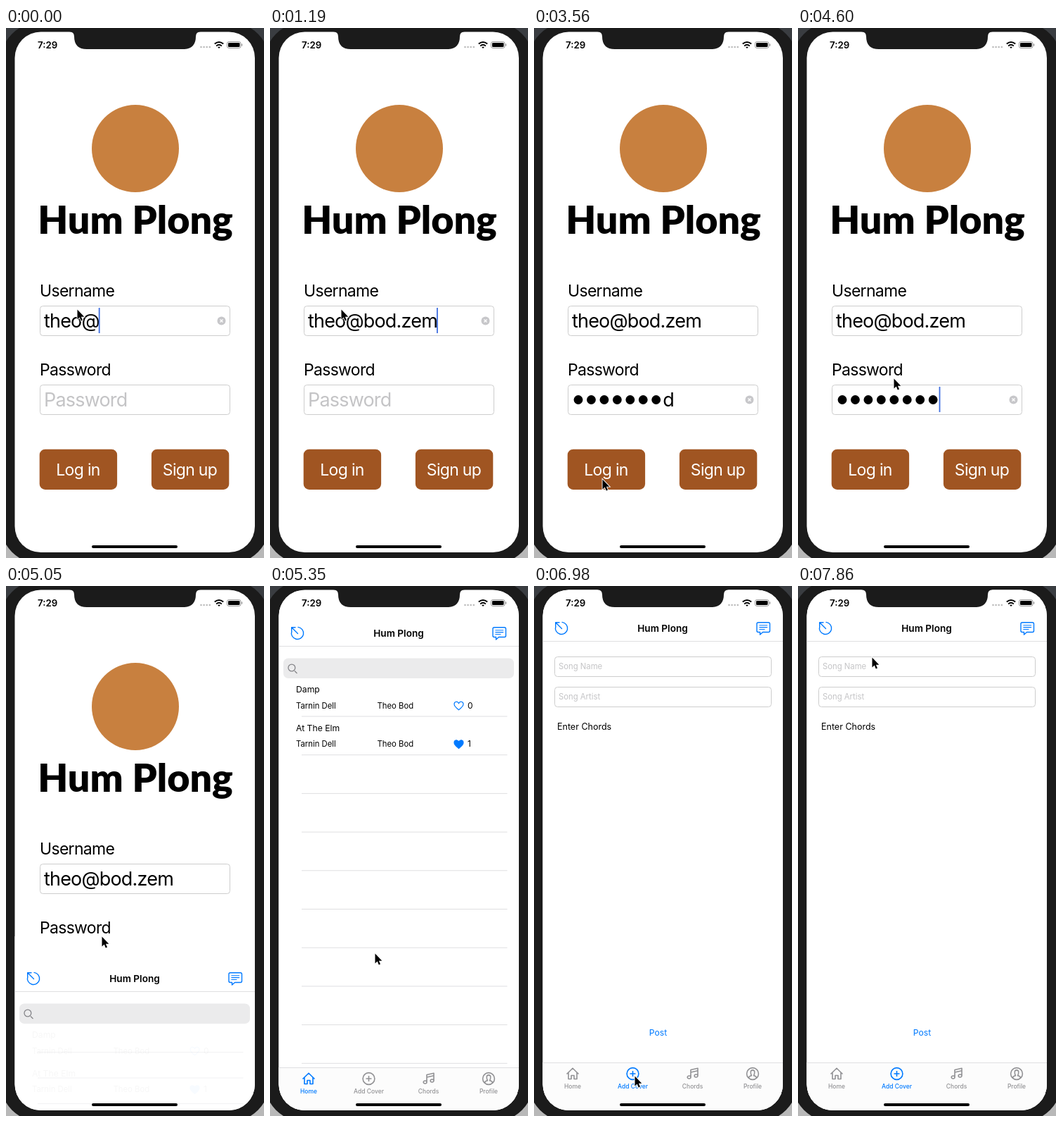
Recreate the animation shown at these times as an HTML page. Size 367x752 px, loop 8000 ms.

```html
<!DOCTYPE html>
<html lang="en">
<head>
<meta charset="utf-8">
<title>Hum Plong</title>
<style>
  html, body { margin: 0; width: 100%; height: 100%; overflow: hidden; background: #1b1b1b; }
  svg { display: block; width: 100%; height: 100%; font-family: Inter, Roboto, sans-serif; }
  .big { font-size: 23px; letter-spacing: -.03em; }
  .entry { font-size: 27px; letter-spacing: -.03em; }
  .title { font: 900 55.5px Lato, "Open Sans", sans-serif; }
  .row { font-size: 12.2px; }
  .sub { font-size: 11.3px; }
  .mid { text-anchor: middle; }
  .hint { fill: #c4c4c6; }
  .box { fill: #fff; stroke: #cdcdcd; }
  .line { fill: none; stroke: #dfdfe1; }
  .icon { fill: none; stroke: #007aff; stroke-width: 1.4; stroke-linecap: round; stroke-linejoin: round; }
  .tab { color: #929295; font-size: 8.5px; font-weight: 500; }
  .tab.on { color: #007aff; }
  .tab path { fill: none; stroke: currentColor; stroke-width: 1.6; stroke-linejoin: round; }
  .tab text { fill: currentColor; }
</style>
</head>
<body>
<svg viewBox="0 0 367 752">
  <defs>
    <clipPath id="glass"><rect x="12.5" y="5.5" width="341.5" height="738.5" rx="37"/></clipPath>
    <path id="heart" d="M0 5.7C-4 2.8-6.5.4-6.5-2.4C-6.5-6.2-1.8-7.2 0-3.6C1.8-7.2 6.5-6.2 6.5-2.4C6.5.4 4 2.8 0 5.7Z"/>
    <g id="clear">
      <circle r="6" fill="#c7c7ca"/>
      <path d="M-2-2 2 2M2-2-2 2" stroke="#fff" stroke-width="1.3"/>
    </g>
  </defs>

  <rect width="367" height="376" fill="#3a3d41"/>
  <rect y="376" width="367" height="376" fill="#b8b8b8"/>
  <rect x="-8" y="-8" width="383" height="768" rx="56" fill="#1b1b1b"/>

  <g clip-path="url(#glass)">
    <rect width="367" height="752" fill="#fff"/>

    <g id="login">
      <circle cx="184" cy="171" r="62" fill="#c8803f"/>
      <text class="title mid" x="184" y="292">Hum Plong</text>
      <text class="big" x="48" y="381">Username</text>
      <rect class="box" x="48.5" y="394.5" width="270" height="42" rx="4"/>
      <text class="entry" id="user" x="54" y="425"/>
      <text class="big" x="48" y="493">Password</text>
      <rect class="box" x="48.5" y="506.5" width="270" height="42" rx="4"/>
      <text class="entry hint" id="passHint" x="54" y="537">Password</text>
      <g id="dots"></g>
      <text class="entry" id="last" y="537"/>
      <use href="#clear" id="clearBtn"/>
      <rect id="caret" x="-1" width="1.8" height="36" fill="#3f6fe0"/>
      <g fill="#a05522">
        <rect x="47.7" y="597.7" width="110.4" height="57.2" rx="8"/>
        <rect x="206.9" y="597.7" width="110.4" height="57.2" rx="8"/>
      </g>
      <g class="big mid" fill="#fff">
        <text x="102.5" y="635">Log in</text>
        <text x="261.5" y="635">Sign up</text>
      </g>
    </g>

    <g id="app">
      <rect width="367" height="752" fill="#fff"/>
      <text class="mid" x="183" y="65" font-size="13.6" font-weight="600">Hum Plong</text>
      <g class="icon">
        <path d="M40 51.4A8.6 8.6 0 1 1 30.9 57.2M39.5 60.5 31 52M30.7 57V51.7H36"/>
        <path d="M319 51.7H333.5Q335.5 51.7 335.5 53.7V63.5Q335.5 65.5 333.5 65.5H325.5L321.5 69V65.5H319Q317 65.5 317 63.5V53.7Q317 51.7 319 51.7Z"/>
        <path d="M320.8 55.7H331.7M320.8 58.6H331.7M320.8 61.5H328" stroke-width="1.1"/>
      </g>
      <path class="line" d="M13 78.5H354"/>

      <g id="home">
        <rect x="19" y="95.5" width="328" height="28.5" rx="7" fill="#ebebec"/>
        <path d="M35 113.5 38.5 117M35.8 109A4.9 4.9 0 1 1 26 109A4.9 4.9 0 1 1 35.8 109" fill="none" stroke="#858589" stroke-width="1.3"/>
        <path class="line" id="rules"/>
        <g id="rows"></g>
      </g>

      <g id="add">
        <rect class="box" x="29.5" y="100.5" width="308" height="28" rx="4"/>
        <rect class="box" x="29.5" y="143.5" width="308" height="28" rx="4"/>
        <g class="sub hint">
          <text x="35" y="118">Song Name</text>
          <text x="35" y="161">Song Artist</text>
        </g>
        <text x="33" y="204" font-size="12.5">Enter Chords</text>
        <text class="mid" x="176.5" y="638" font-size="12.2" fill="#007aff">Post</text>
      </g>

      <rect y="676" width="367" height="76" fill="#fcfcfc"/>
      <path class="line" d="M13 676.5H354"/>
      <g id="tabs"></g>
    </g>

    <rect x="122" y="734" width="122" height="4" rx="2"/>
  </g>

  <path d="M90 5Q97 5.5 97 12Q97 30 115 30H252Q270 30 270 12Q270 5.5 277 5Z" fill="#1b1b1b"/>
  <text x="45" y="28.5" font-size="13.3" font-weight="600">7:29</text>
  <path d="M277.5 27H291" stroke="#bbb" stroke-width="2.6" stroke-linecap="round" stroke-dasharray="0 4.1"/>
  <g fill="none" stroke="#000" stroke-width="2">
    <path d="M296.8 22.6Q303 17.4 309.2 22.6M299.2 25.4Q303 22.2 306.8 25.4"/>
    <path d="M301.2 27.2Q303 25.6 304.8 27.2L303 29Z" fill="#000" stroke="none"/>
    <rect x="314.5" y="19.5" width="19.5" height="9" rx="2.6" stroke="#999" stroke-width="1"/>
    <rect x="316" y="21" width="16.5" height="6" rx="1.3" fill="#000" stroke="none"/>
    <path d="M335.6 22.5V25.5" stroke="#999" stroke-width="1.3"/>
  </g>

  <g id="mouse">
    <path d="M.5.5V14.5L3.7 11.5 5.8 16.5 8 15.6 5.9 10.7H10.3Z" stroke="#fff" stroke-width="1.8" paint-order="stroke"/>
  </g>
</svg>

<script>
const LOOP = 8000, TICK = 148.3;
const USER = "theo@bod.zem", PASS = "password";
const $ = id => document.getElementById(id);
const show = (id, on) => $(id).setAttribute("display", on ? "inline" : "none");
const move = (id, x, y) => $(id).setAttribute("transform", `translate(${x} ${y})`);

// [tick, characters typed]
const userKeys = [[0, 5], [1, 6], [2, 7], [3, 8], [5, 9], [6, 10], [8, 12]];
const passKeys = [[0, 0], [11, 2], [12, 3], [14, 5], [15, 6], [16, 7], [18, 8]];
// [tick, x, y]
const path = [
  [0, 101, 399], [19, 101, 399], [21, 73, 530], [24, 97, 640], [25, 97, 640],
  [29, 136, 497], [34, 136, 497], [36, 149, 521], [40, 174, 648], [41, 174, 648],
  [42, 168, 681], [44, 143, 695], [48, 143, 695], [49, 124, 330], [50, 165, 97],
  [51, 165, 97], [52, 127, 92], [53, 105, 101]
];
const FOCUS = 9, MASK = 31, OPEN = 34, SWITCH = 46;

const held = (keys, k) => keys.filter(e => e[0] <= k).pop()[1];

function mouseAt(k) {
  const i = path.findIndex(p => p[0] >= k);
  if (i < 1) return path[i < 0 ? path.length - 1 : 0].slice(1);
  const [a, b] = [path[i - 1], path[i]], f = (k - a[0]) / (b[0] - a[0]);
  return [1, 2].map(j => a[j] + (b[j] - a[j]) * f);
}

const rules = (y, step) =>
  Array.from({ length: 10 }, (_, i) => `M45 ${y + i * step}H337.5`).join("");

// Critically damped slide from below
function slide(k) {
  const u = 1.18 + 2.76 * (k - OPEN);
  return Math.round(742 * (1 + u) * Math.exp(-u));
}

$("dots").innerHTML = [...PASS].map((_, i) =>
  `<circle cx="${63 + 18.45 * i}" cy="527.5" r="6.4"/>`).join("");

$("rows").innerHTML = ["Damp", "At The Elm"].map((song, i) => `
  <g transform="translate(0 ${i * 54.7})">
    <text class="row" x="37" y="144">${song}</text>
    <g class="sub">
      <text x="37" y="166.5">Tarnin Dell</text>
      <text x="152.5" y="166.5">Theo Bod</text>
      <text x="281" y="166.8" font-size="12">${i}</text>
    </g>
    <use href="#heart" x="268.5" y="163" fill="${i ? "#007aff" : "none"}" stroke="#007aff" stroke-width="1.2"/>
  </g>`).join("");

const ring = r => `M${r} 0A${r} ${r} 0 1 1 ${-r} 0A${r} ${r} 0 1 1 ${r} 0`;
$("tabs").innerHTML = [
  ["Home", 55, "M-8.5.5 0-7.8 8.5.5M-6-1.5V7.5H-2V2.5H2V7.5H6V-1.5"],
  ["Add Cover", 140.5, ring(8.4) + "M-4 0H4M0-4V4"],
  ["Chords", 225.5, "M-2.5 5V-5.5L7.5-7.8V3M-2.5-2 7.5-4.3M-2.5 5A2.4 2 0 1 1-7.3 5A2.4 2 0 1 1-2.5 5M7.5 3A2.4 2 0 1 1 2.7 3A2.4 2 0 1 1 7.5 3"],
  ["Profile", 311, ring(8.4) + "M-5.8 6Q-4.5 3-1.5 2.8Q-3-.5-2.7-2.4A2.7 2.7 0 0 1 2.7-2.4Q3-.5 1.5 2.8Q4.5 3 5.8 6"]
].map(([name, x, d]) => `
  <g class="tab" transform="translate(${x} 692)">
    <path d="${d}"/><text class="mid" y="21.3">${name}</text>
  </g>`).join("");

function drawLogin(k) {
  const typed = held(passKeys, k), inPass = k >= FOCUS;
  const masked = k >= MASK ? typed : Math.max(0, typed - 1);
  const end = 54 + 18.45 * masked;
  $("user").textContent = USER.slice(0, held(userKeys, k));
  $("last").textContent = PASS.slice(masked, typed);
  $("last").setAttribute("x", end);
  [...$("dots").children].forEach((dot, i) => dot.setAttribute("opacity", +(i < masked)));
  show("passHint", !typed);
  show("clearBtn", !inPass || typed);
  move("clearBtn", 306.5, inPass ? 527.5 : 415.5);
  show("caret", k < 22 || (k >= 26 && k < 29) || k >= MASK);
  if (inPass) move("caret", end + $("last").getComputedTextLength(), 509);
  else move("caret", 54 + $("user").getComputedTextLength(), 397);
}

function drawApp(k) {
  const loading = k === OPEN;
  show("app", k >= OPEN);
  move("app", 0, k >= OPEN ? slide(k) : 752);
  show("home", k < SWITCH);
  show("add", k >= SWITCH);
  $("rows").setAttribute("opacity", loading ? .03 : 1);
  $("rules").setAttribute("opacity", loading ? .4 : 1);
  $("rules").setAttribute("d", loading ? rules(164.5, 36.5) : rules(178, 54.7));
  [...$("tabs").children].forEach((tab, i) =>
    tab.classList.toggle("on", i === +(k >= SWITCH)));
}

const start = performance.now();
let shown = -1;
function frame() {
  const ms = (performance.now() - start) % LOOP;
  const k = Math.min(53, Math.floor((ms + 10) / TICK));
  if (k !== shown) {
    shown = k;
    drawLogin(k);
    drawApp(k);
    move("mouse", ...mouseAt(k));
  }
  requestAnimationFrame(frame);
}
frame();
</script>
</body>
</html>
```
